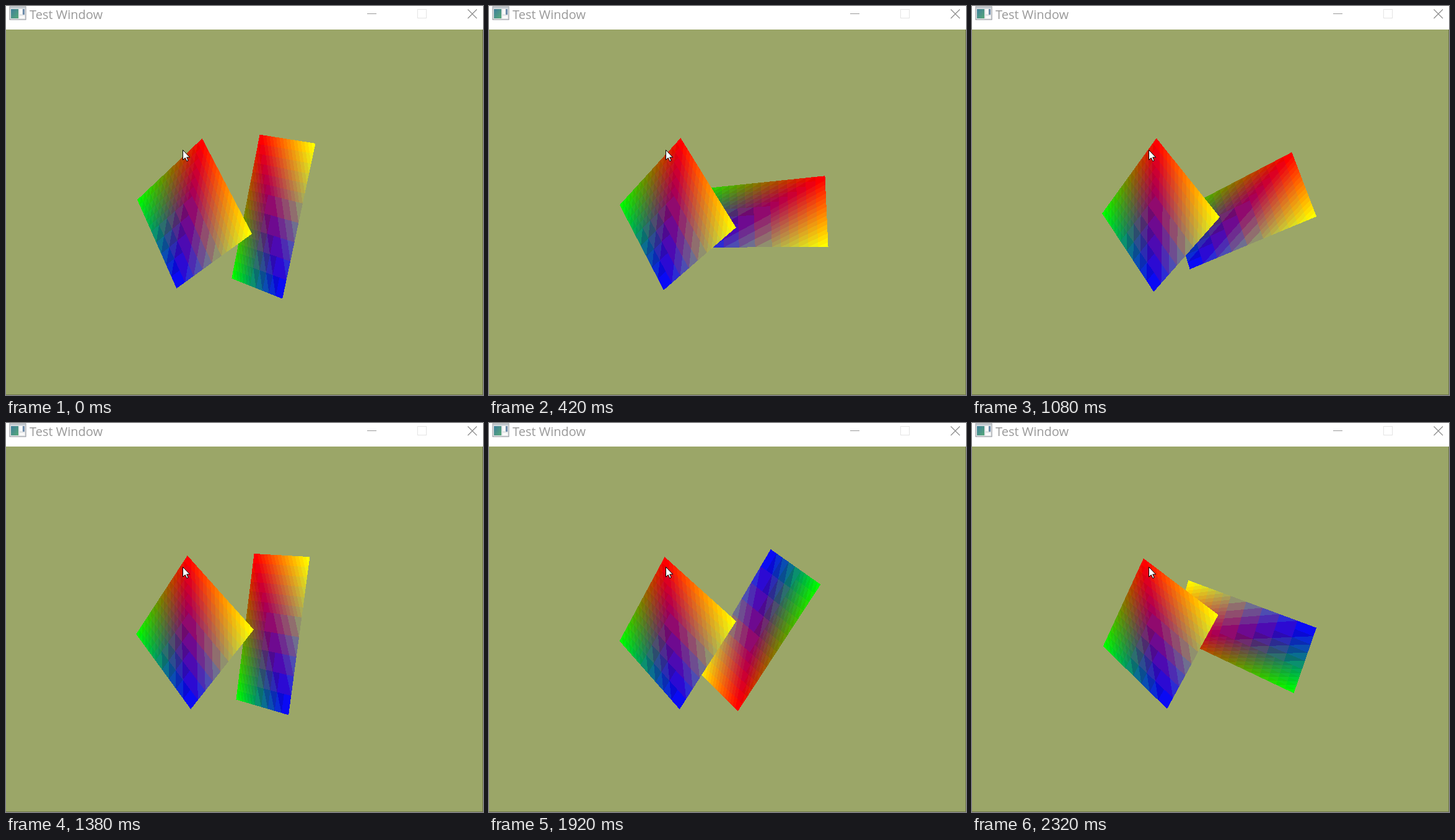
These frames come from a looping animation (770x628 px, 2.42 s). An HTML page with a canvas:

```html
<!DOCTYPE html>
<html lang="en">
<head>
<meta charset="utf-8">
<title>Test Window</title>
<style>
  html, body { margin: 0; width: 100%; height: 100%; overflow: hidden; background: #9ba668; }
  #stage { position: relative; width: 770px; height: 628px; overflow: hidden; }
  canvas, svg { position: absolute; left: 0; top: 0; display: block; }
  text { font: 20px "Open Sans", "Noto Sans", sans-serif; fill: #999; }
</style>
</head>
<body>
<div id="stage">
  <canvas id="view" width="770" height="628"></canvas>
  <svg width="770" height="628" viewBox="0 0 770 628">
    <rect width="770" height="38" fill="#fff"/>
    <path d="M769.5 38V628M0 627.5H770" stroke="#6f774b"/>

    <linearGradient id="pane" x2="1" y2="1">
      <stop offset="0" stop-color="#3f7f9c"/>
      <stop offset="1" stop-color="#55a878"/>
    </linearGradient>
    <rect x="6" y="1" width="26" height="21" fill="#e4e6e8" stroke="#8b9096"/>
    <rect x="6.5" y="1.5" width="25" height="2.5" fill="#c3cad0"/>
    <rect x="8" y="5" width="12" height="15" fill="url(#pane)"/>
    <rect x="22" y="5" width="4" height="8" fill="#fafafa"/>
    <rect x="27" y="5" width="3" height="9" fill="#6d8cab"/>
    <rect x="22" y="16" width="8" height="4" fill="#fafafa"/>

    <text x="38" y="21">Test Window</text>
    <g fill="none">
      <path d="M583 12.5H598" stroke="#999"/>
      <rect x="664.5" y="5.5" width="14" height="14" stroke="#e4e4e4"/>
      <path d="M745.5 5.5L760 20M760 5.5L745.5 20" stroke="#8c8c8c" stroke-width="1.2"/>
    </g>
    <path d="M285.5 232.5V248.5L289.2 245.1L291.8 250.6L294.2 249.5L291.7 244.2H296.6Z"
          fill="#fff" stroke="#000"/>
  </svg>
</div>
<script>
const LOOP = 2420;
const TICK = 16.688; // degrees the fast card turns per tick
// [start in ms, ticks elapsed]
const STEPS = [
  [0, 0], [120, 8], [280, 18], [420, 26], [570, 36], [700, 44],
  [840, 52], [960, 60], [1080, 68], [1240, 78], [1380, 86], [1540, 96],
  [1680, 104], [1800, 112], [1920, 120], [2040, 128], [2190, 138], [2320, 146]
];
// Cards spin in a tilted plane: projected centre, radii, perspective,
// half angle between the diagonals, start angle and gearing.
const CARDS = [
  { cx: 295.5, cy: 337.6, a: 94, b: 124, e: 0.1, half: 45, start: 32.3, gear: 0.01 },
  { cx: 427.6, cy: 337.8, a: 114.6, b: 134.2, e: 0.108, half: 22.6, start: 76.6, gear: -1 }
];
const AREA = { x: 205, y: 198, w: 356, h: 280 };
const BACK = [155, 166, 104];
const rad = deg => deg * Math.PI / 180;
const ctx = document.getElementById("view").getContext("2d");
const image = ctx.createImageData(AREA.w, AREA.h);

function pose(card, ticks) {
  const angle = rad(card.start + card.gear * TICK * ticks);
  const half = rad(card.half);
  return { ...card, cos: Math.cos(angle), sin: Math.sin(angle),
           long: 2 * Math.cos(half), wide: 2 * Math.sin(half) };
}

// Palette bands: finer where there is little blue.
function band(value, fine) {
  return fine ? 17 * Math.min(15, Math.floor(value * 16))
              : 10 + 33.5 * Math.min(7, Math.floor(value * 8));
}

// Colour of a card at a screen point, or null outside it.
function shade(c, x, y) {
  const k = (x - c.cx) / c.a;
  const u = k / (1 + c.e * k);
  const v = (c.cy - y) / c.b * (1 - c.e * u);
  const s = (u * c.cos + v * c.sin) / c.long + 0.5;
  const t = (v * c.cos - u * c.sin) / c.wide + 0.5;
  if (s < 0 || s > 1 || t < 0 || t > 1) return null;
  const blue = 1 - Math.max(s, t);
  const fine = blue < 0.375;
  return [band(s, fine), band(Math.abs(s - t), fine), band(blue, fine)];
}

function draw(ticks) {
  const [front, rear] = CARDS.map(card => pose(card, ticks));
  const data = image.data;
  let i = 0;
  for (let row = 0; row < AREA.h; row++) {
    for (let col = 0; col < AREA.w; col++) {
      const x = AREA.x + col + 0.5, y = AREA.y + row + 0.5;
      const rgb = shade(front, x, y) || shade(rear, x, y) || BACK;
      data[i++] = rgb[0];
      data[i++] = rgb[1];
      data[i++] = rgb[2];
      data[i++] = 255;
    }
  }
  ctx.putImageData(image, AREA.x, AREA.y);
}

ctx.fillStyle = `rgb(${BACK})`;
ctx.fillRect(0, 0, 770, 628);

let shown = -1;
const began = performance.now();
function frame() {
  const time = Math.max(0, performance.now() - began) % LOOP;
  const ticks = STEPS.findLast(step => step[0] <= time)[1];
  if (ticks !== shown) draw(shown = ticks);
  requestAnimationFrame(frame);
}
frame();
</script>
</body>
</html>
```
